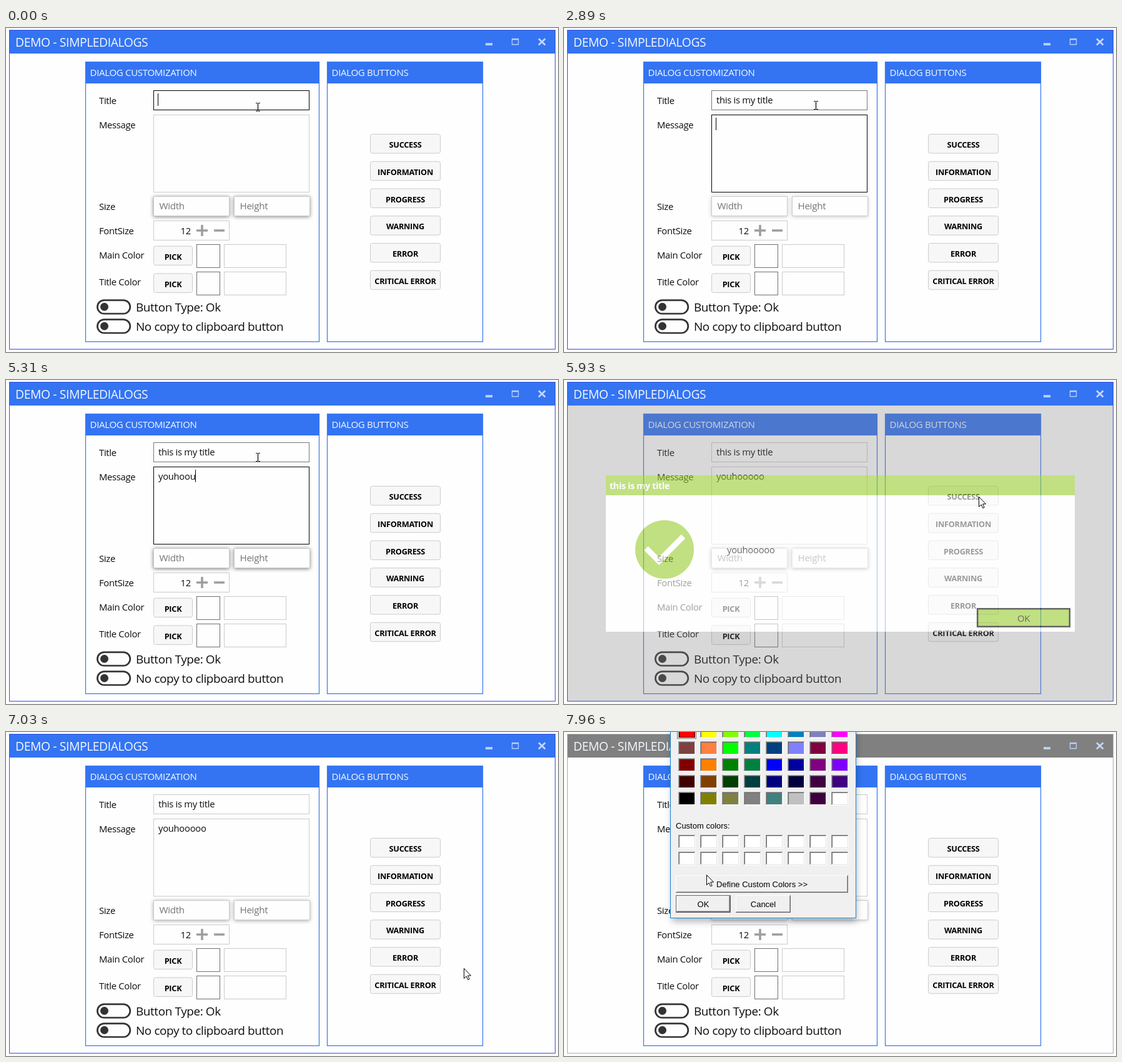
Write an HTML page that moves like this. It is 884 by 520 pixels and loops after 8 s.

```html
<!DOCTYPE html>
<html lang="en">
<head>
<meta charset="utf-8">
<title>Simple dialogs demo</title>
<style>
html, body { margin: 0; width: 100%; height: 100%; overflow: hidden; background: #fefefe; }
svg { display: block; width: 884px; height: 520px; }
text { font: 14.8px "Open Sans", "Noto Sans", sans-serif; letter-spacing: -.02em; fill: #0c0c0c; white-space: pre; }
.head { font-size: 15px; fill: #f4f8ff; }
.bar { font-size: 19.3px; fill: #f4f8ff; }
.big { font-size: 18.9px; }
.hint { font-size: 15.2px; fill: #757575; }
.btn { font-size: 12.7px; font-weight: 700; text-anchor: middle; fill: #000; }
.bold { font-size: 14.2px; font-weight: 700; fill: #fff; }
.mid { text-anchor: middle; }
.win { font: 13px "Liberation Sans", Arial, sans-serif; letter-spacing: 0; fill: #000; }
</style>
</head>
<body>
<svg id="stage" viewBox="0 0 884 520" xmlns="http://www.w3.org/2000/svg"></svg>
<script>
const LOOP = 8000;
const BLUE = '#3474f2', GREEN = '#9acd32', PAPER = '#fefefe', LINE = '#cbcbcb';
const EDGE = '#3b4be0', EDGE_AWAY = '#aaa';

const rect = (x, y, w, h, fill, stroke = 'none', more = '') =>
  `<rect x="${x}" y="${y}" width="${w}" height="${h}" fill="${fill}" stroke="${stroke}" ${more}/>`;
const text = (x, y, s, cls = '', more = '') => `<text x="${x}" y="${y}" class="${cls}" ${more}>${s}</text>`;
const path = (d, stroke, width, more = '') =>
  `<path d="${d}" fill="none" stroke="${stroke}" stroke-width="${width}" ${more}/>`;
const group = (id, body) => `<g id="${id}">${body}</g>`;
const blur = (id, size) =>
  `<filter id="${id}" x="-20%" y="-60%" width="140%" height="220%"><feGaussianBlur stdDeviation="${size}"/></filter>`;

const panel = (x, w, title) =>
  rect(x + .5, 54.5, w - 1, 449, 'none', BLUE, 'stroke-width="1.2"') +
  rect(x, 54, w, 35, BLUE) + text(x + 7.5, 77, title, 'head');

const button = (x, y, w, label) =>
  rect(x + .5, y + .5, w, 30.5, '#f7f7f7', LINE, 'rx="3"') + text(x + w / 2 + .5, y + 22, label, 'btn');

const sizeBox = (x, label) =>
  rect(x, 271, 121.5, 32, '#000', 'none', 'class="glow" filter="url(#soft)"') +
  rect(x + .5, 270.5, 121, 31, PAPER, LINE) + text(x + 9.5, 291, label, 'hint');

const colorRow = (y, label, base) =>
  text(149, base, label) + button(236, y + 2.6, 62, 'PICK') +
  rect(305.5, y + .5, 37, 37, PAPER, '#707070') + rect(349.5, y + .5, 99, 37, PAPER, LINE);

const toggle = (y, label) =>
  rect(146.4, y - 10.6, 52.4, 21.6, PAPER, '#333', 'rx="10.8" stroke-width="2.7"') +
  `<circle cx="157.5" cy="${y}" r="6.5" fill="#333"/>` + text(208, y + 7.5, label, 'big');

function mainWindow() {
  const names = ['SUCCESS', 'INFORMATION', 'PROGRESS', 'WARNING', 'ERROR', 'CRITICAL ERROR'];
  return rect(5.5, 3.5, 874, 512, PAPER, EDGE, 'id="frame"') +
    rect(6, 4, 873, 37, BLUE, 'none', 'id="bar"') +
    text(15, 30, 'DEMO - SIMPLEDIALOGS', 'bar') +
    rect(768, 24, 11, 4, '#b9cdf9') +
    path('M810.5 17.5h10v9h-10zM810 18.5h11', '#b9cdf9', 1.3) +
    path('M853 17.2l10.5 10M863.5 17.2l-10.5 10', '#c6d7fb', 2.7) +
    panel(127, 375, 'DIALOG CUSTOMIZATION') + panel(514, 250, 'DIALOG BUTTONS') +
    text(149, 122, 'Title') + text(149, 161, 'Message') + text(149, 292, 'Size') + text(149, 331, 'FontSize') +
    rect(236.5, 100.5, 249, 31, PAPER, LINE, 'id="titleBox"') +
    rect(236.5, 139.5, 249, 124, PAPER, LINE, 'id="msgBox"') +
    text(244, 121, '', '', 'id="titleText"') + text(244, 160, '', '', 'id="msgText"') +
    rect(243, 105, 1, 20, '#000', 'none', 'id="caret"') +
    sizeBox(236, 'Width') + sizeBox(365, 'Height') +
    rect(236.5, 309.5, 121, 31, PAPER, LINE) + text(279.5, 331, '12') +
    path('M305 325h18M314 316v18M333 325h17', '#a19c9d', 3.6) +
    colorRow(347, 'Main Color', 370) + colorRow(391, 'Title Color', 413) +
    toggle(447.5, 'Button Type: Ok') + toggle(478.5, 'No copy to clipboard button') +
    names.map((n, i) => button(583, 170 + i * 43.75, 112, n)).join('');
}

function successDialog() {
  return rect(6, 41, 873, 474, '#808080', 'none', 'opacity=".5"') +
    rect(67, 153, 751, 251, '#fff') + rect(67, 153, 751, 32, GREEN) +
    text(73, 175, 'this is my title', 'bold') +
    `<circle cx="161" cy="272" r="47" fill="${GREEN}"/>` +
    path('M131.5 270L152 290.5L191 251', '#fff', 9) +
    text(261, 278, 'youhooooo') +
    rect(662.2, 367.2, 147.6, 28.6, GREEN, '#000', 'id="ok" stroke-width="2.5"') +
    text(736, 388, 'OK', 'mid');
}

function colorDialog() {
  const rows = [
    'ff0000 ffff00 80ff00 00ff40 00ffff 0080c0 8080c0 ff00ff',
    '804040 ff8040 00ff00 008080 004080 8080ff 800040 ff0080',
    '800000 ff8000 008000 008040 0000ff 0000a0 800080 8000ff',
    '400000 804000 004000 004040 000080 000040 400040 400080',
    '000000 808000 808040 808080 408080 c0c0c0 400040 ffffff'
  ];
  const cell = (i, y, fill) => {
    const x = 183 + i * 35;
    return rect(x, y, 28, 22, '#fff') + rect(x, y, 27, 21, '#a0a0a0') +
      rect(x + 1, y + 1, 26, 20, '#e3e3e3') + rect(x + 1, y + 1, 25, 19, '#696969') +
      rect(x + 2, y + 2, 24, 18, fill);
  };
  const raised = (x, y, w, h, label) =>
    rect(x, y, w, h, '#696969') + rect(x, y, w - 1, h - 1, '#fff') +
    rect(x + 1, y + 1, w - 2, h - 2, '#a0a0a0') + rect(x + 1, y + 1, w - 3, h - 3, '#f0f0f0') +
    text(x + w / 2, y + h / 2 + 4.5, label, 'win mid');
  let s = rect(173, -20, 295, 324, '#000', 'none', 'opacity=".3" filter="url(#wide)"') +
    rect(170.5, -20.5, 297, 319, '#f0f0f0', '#1883d7');
  rows.forEach((row, r) => row.split(' ').forEach((c, i) => { s += cell(i, r * 27 - 12, '#' + c); }));
  s += rect(181.5, -13.5, 30, 24, 'none', '#000', 'stroke-dasharray="1 1"') +
    rect(184.5, -10.5, 25, 19, 'none', '#000');
  for (let i = 0; i < 16; i++) s += cell(i % 8, i < 8 ? 165 : 192, '#fff');
  return s + text(179, 155, 'Custom colors:', 'win') +
    raised(179, 230, 276, 28, 'Define Custom Colors &gt;&gt;') +
    rect(179, 262, 88, 28, '#646464') + raised(180, 263, 86, 26, 'OK') +
    raised(275, 262, 88, 28, 'Cancel');
}

const stage = document.getElementById('stage');
stage.innerHTML =
  `<defs>${blur('soft', 3)}${blur('wide', 6)}</defs>` +
  mainWindow() + group('success', successDialog()) + group('colors', colorDialog()) +
  group('beam', path('M-3.5 -6.5h3M.5 -6.5h3M0 -6v12M-3.5 6.5h3M.5 6.5h3', '#000', 1.2)) +
  group('arrow', '<path d="M.5 .5V16.5L4.2 13L6.8 18.7L9.2 17.6L6.6 12H11.5Z" fill="#fff" stroke="#000"/>');

const $ = id => document.getElementById(id);
const glows = document.querySelectorAll('.glow');
const clamp = v => Math.max(0, Math.min(1, v));
const span = (t, a, b) => clamp((t - a) / (b - a));
const smooth = p => p * p * (3 - 2 * p);
const show = (el, on) => el.setAttribute('visibility', on ? 'visible' : 'hidden');
const put = (el, [x, y]) => el.setAttribute('transform', `translate(${x.toFixed(2)} ${y.toFixed(2)})`);
const mix = (a, b, p) => a.map((v, i) => v + (b[i] - v) * p);

const TITLE = 'this is my title', TITLE_START = 800, KEY = 115;
const FOCUS = 2850, OPEN = 5860, CLOSE = 7000, PICKED = 7560;
// Message keystrokes: '<' deletes the last letter.
const KEYS = 'youhoou<ooo';
const KEY_TIMES = [3740, 3900, 4130, 4370, 4620, 4850, 5130, 5400, 5510, 5620, 5730];

function typed(t) {
  if (t < FOCUS) {
    const n = Math.max(0, Math.min(TITLE.length, Math.floor((t - TITLE_START) / KEY) + 1));
    return { title: TITLE.slice(0, n), msg: '', last: n ? TITLE_START + (n - 1) * KEY : 0 };
  }
  let msg = '', last = FOCUS;
  KEY_TIMES.forEach((k, i) => {
    if (t < k) return;
    msg = KEYS[i] === '<' ? msg.slice(0, -1) : msg + KEYS[i];
    last = k;
  });
  return { title: TITLE, msg, last };
}

function arrowAt(t) {
  const start = [664, 187], ok = [733, 379], pick = [268, 366], inside = [262, 293], end = [228, 229];
  if (t < CLOSE) return mix(start, ok, 1 - Math.pow(1 - span(t, 6240, 6820), 4.2));
  if (t < 7620) return mix(ok, pick, smooth(span(t, 7030, 7420)));
  if (t < 7790) return mix(pick, inside, smooth(span(t, 7620, 7790)));
  return mix(inside, end, smooth(span(t, 7790, 7960)));
}

function draw(t) {
  const { title, msg, last } = typed(t);
  const editing = t < OPEN, inTitle = t < FOCUS;
  $('titleText').textContent = title;
  $('msgText').textContent = msg;
  $('titleBox').setAttribute('stroke', !editing ? LINE : inTitle ? '#000' : '#777');
  $('msgBox').setAttribute('stroke', editing && !inTitle ? '#000' : LINE);

  const line = $(inTitle ? 'titleText' : 'msgText');
  const width = line.textContent ? line.getComputedTextLength() : -1;
  $('caret').setAttribute('x', Math.round(244 + width));
  $('caret').setAttribute('y', inTitle ? 105 : 144);
  show($('caret'), editing && (t - last) % 1060 < 530);

  const pulse = .5 - .5 * Math.cos((t - 3185) / 4900 * 2 * Math.PI);
  glows.forEach(g => g.setAttribute('opacity', (.2 + .35 * pulse).toFixed(3)));

  show($('success'), t >= OPEN && t < CLOSE);
  $('success').setAttribute('opacity', span(t, OPEN - 35, 6000));

  const away = t >= PICKED;
  show($('colors'), away);
  $('bar').setAttribute('fill', away ? '#808080' : BLUE);
  $('frame').setAttribute('stroke', away ? EDGE_AWAY : EDGE);

  show($('beam'), editing);
  put($('beam'), [403.5, 127 - 3 * smooth(span(t, 250, 450))]);
  show($('arrow'), !editing);
  const tip = arrowAt(t);
  put($('arrow'), tip);
  $('ok').setAttribute('fill', t < CLOSE && tip[1] > 366 ? '#a9d552' : GREEN);
}

const begin = performance.now();
function tick() {
  draw((performance.now() - begin) % LOOP);
  requestAnimationFrame(tick);
}
tick();
</script>
</body>
</html>
```
